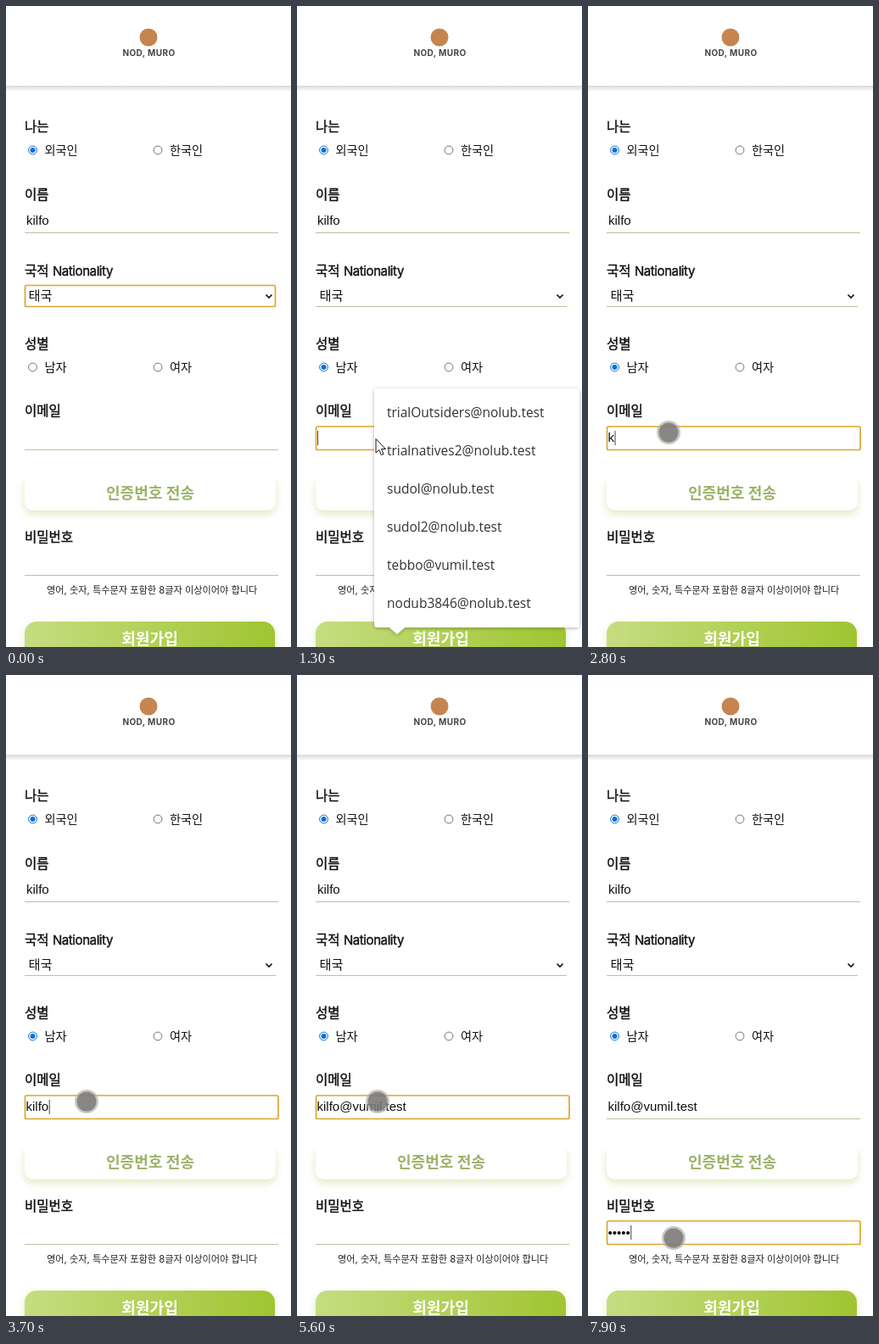
An HTML page that plays this animation: 336x756 px, repeating every 8000 ms.

```html
<!DOCTYPE html>
<html lang="ko">
<head>
<meta charset="utf-8">
<style>
html, body { margin: 0; width: 100%; height: 100%; overflow: hidden; background: #fff }
svg { display: block; width: 336px; height: 756px }
text { font-family: Inter, "Noto Sans CJK KR", "Noto Sans CJK", sans-serif; font-size: 14.2px; fill: #111; white-space: pre }
.label { font-size: 15.5px; stroke: #111; stroke-width: .4px }
.latin { font-size: 15px; letter-spacing: -.4px }
.input { font: 15px "Liberation Sans", Arial, sans-serif }
.button { font-size: 18.1px; font-weight: 700; text-anchor: middle }
.line { stroke: #bbc39b; stroke-width: 1.2 }
.focus { fill: none; stroke: #dba62c; stroke-width: 1.7 }
.mail text { font: 15.5px "Open Sans", "Noto Sans", sans-serif; fill: #333 }
</style>
</head>
<body>
<svg viewBox="0 0 336 756">
  <defs>
    <linearGradient id="green"><stop stop-color="#c5dd81"/><stop offset="1" stop-color="#a0c531"/></linearGradient>
    <linearGradient id="shade" x2="0" y2="1"><stop stop-color="#d9d9d9"/><stop offset="1" stop-color="#fff"/></linearGradient>
    <filter id="soft" x="-10%" y="-50%" width="120%" height="200%"><feDropShadow dx="0" dy="4" stdDeviation="5" flood-color="#b5ca68" flood-opacity=".42"/></filter>
    <filter id="drop"><feDropShadow dx="0" dy="1" stdDeviation="2" flood-opacity=".3"/></filter>
    <clipPath id="below"><path d="M0 559H336V620H0z"/></clipPath>
  </defs>

  <rect y="94" width="336" height="7" fill="url(#shade)"/>
  <circle cx="168" cy="37" r="10.5" fill="#c6844f"/>
  <text x="168.5" y="59" text-anchor="middle" style="font-size:10px;font-weight:700;letter-spacing:.4px;fill:#444">NOD, MURO</text>

  <g id="form"></g>
  <text class="label" x="22" y="317.5">국적 <tspan class="latin">Nationality</tspan></text>
  <text class="input" x="24" y="258">kilfo</text>
  <text x="26.5" y="346.5" style="font-size:15.2px">태국</text>
  <path d="M306.5 340.5l3.5 3.5 3.5-3.5" fill="none" stroke="#111" stroke-width="1.7"/>

  <g clip-path="url(#below)"><rect x="22" y="554" width="296" height="41" rx="10" fill="#fff" filter="url(#soft)"/></g>
  <text class="button" x="170" y="581" style="fill:#9ab368">인증번호 전송</text>
  <text x="48" y="693" style="font-size:11.2px;fill:#222">영어, 숫자, 특수문자 포함한 8글자 이상이어야 합니다</text>
  <rect x="22" y="726" width="295" height="46" rx="14" fill="url(#green)" filter="url(#soft)"/>
  <text class="button" x="169.5" y="752.5" style="fill:#fff">회원가입</text>

  <rect class="focus" id="selectFocus" x="22.5" y="329.5" width="295" height="25" rx="2"/>
  <rect class="focus" id="inputFocus" x="22.5" width="298.5" height="27.5" rx="2"/>
  <text class="input" id="email" x="23.5" y="514"></text>
  <text class="input" id="password" x="23.5" y="662.5"></text>
  <path id="compose" d="M24 517.5H38" stroke="#111"/>
  <rect id="caret" width="1" height="17" fill="#444"/>

  <g id="popup" class="mail">
    <path d="M95 451H329a4 4 0 0 1 4 4V729a4 4 0 0 1-4 4H127l-9 8-9-8H95a4 4 0 0 1-4-4V455a4 4 0 0 1 4-4z" fill="#fff" filter="url(#drop)"/>
  </g>
  <path id="arrow" d="M0 0V16.5L3.8 13 6.3 19 9 17.8 6.5 12H11.5z" fill="#fff" stroke="#111"/>
  <g id="touch">
    <circle r="14" fill="#aaa" fill-opacity=".65"/>
    <circle r="11.5" fill="#6c6864" fill-opacity=".68"/>
  </g>
</svg>
<script>
const $ = id => document.getElementById(id);
const LOOP = 8000, EMAIL = 'kilfo@vumil.test';
const emailKeys = [2700, 3000, 3200, 3400, 3600, 3850, 4050, 4200, 4350, 4450, 4600, 4700, 4800, 4900, 5000, 5100];
const passKeys = [7100, 7300, 7500, 7650, 7800];
const PICK = 500, EMAIL_FOCUS = 1100, POPUP = 1200, WRONG_KEY = 1800, ERASE = 2300, PASS_FOCUS = 6700;
// touch point: time, x, y
const route = [[100, 70, 345], [400, 31, 426], [700, 31, 426], [1100, 95, 503], [5600, 95, 503], [6400, 101, 664]];

const label = (text, y) => `<text class="label" x="22" y="${y}">${text}</text>`;
const line = (y, end) => `<path class="line" d="M22 ${y}H${end}"/>`;
const radio = (x, y, text, id) => `<g id="${id}"><circle cx="${x}" cy="${y}" r="4.9" fill="#fff" stroke="#767676"/>
  <circle cx="${x}" cy="${y}" r="3" fill="none"/></g><text x="${x + 14}" y="${y + 5}">${text}</text>`;

$('form').innerHTML =
  label('나는', 148) + label('이름', 228) + label('성별', 404) + label('이메일', 483) + label('비밀번호', 632) +
  line(267.5, 321) + line(354.5, 318) + line(523.5, 321) + line(671.5, 321) +
  radio(31.5, 170, '외국인', 'foreign') + radio(179, 170, '한국인', 'native') +
  radio(31.5, 426, '남자', 'male') + radio(179, 426, '여자', 'female');

$('popup').innerHTML += ['trialOutsiders@nolub.test', 'trialnatives2@nolub.test', 'sudol@nolub.test',
  'sudol2@nolub.test', 'tebbo@vumil.test', 'nodub3846@nolub.test']
  .map((mail, i) => `<text x="106" y="${485 + 45 * i}">${mail}</text>`).join('');

const show = (id, on) => $(id).style.display = on ? '' : 'none';
const place = (id, x, y) => $(id).setAttribute('transform', `translate(${x} ${y})`);
const count = (keys, t) => keys.filter(k => k <= t).length;

function check(id, on) {
  const [ring, dot] = $(id).children;
  ring.setAttribute('stroke', on ? '#0b6fd8' : '#767676');
  dot.setAttribute('fill', on ? '#0b6fd8' : 'none');
}

function touchAt(t) {
  const i = route.findIndex(p => p[0] > t);
  if (i < 1) return route[i ? route.length - 1 : 0].slice(1);
  const [t0, x0, y0] = route[i - 1], [t1, x1, y1] = route[i];
  const u = (t - t0) / (t1 - t0), e = u * u * (3 - 2 * u);
  return [x0 + (x1 - x0) * e, y0 + (y1 - y0) * e];
}

function draw(t) {
  const inPass = t >= PASS_FOCUS, composing = t >= WRONG_KEY && t < ERASE;
  show('selectFocus', t < PICK);
  check('male', t >= PICK);

  $('email').textContent = composing ? 'ㅋ' : EMAIL.slice(0, count(emailKeys, t));
  $('password').textContent = '•'.repeat(count(passKeys, t));
  show('compose', composing);

  show('inputFocus', t >= EMAIL_FOCUS);
  $('inputFocus').setAttribute('y', inPass ? 644 : 496);
  const field = $(inPass ? 'password' : 'email');
  const lastKey = Math.max(...[EMAIL_FOCUS, WRONG_KEY, ERASE, PASS_FOCUS, ...emailKeys, ...passKeys].filter(k => k <= t));
  show('caret', t >= EMAIL_FOCUS && Math.floor((t - lastKey) / 500) % 2 === 0);
  $('caret').setAttribute('x', 24 + field.getComputedTextLength());
  $('caret').setAttribute('y', inPass ? 649 : 501);

  const fade = Math.min(1, Math.max(0, (t - 1800) / 250));
  const popup = t >= POPUP && fade < 1;
  show('popup', popup);
  $('popup').setAttribute('opacity', 1 - fade);
  $('popup').setAttribute('transform', `translate(212 592) scale(${1 - .06 * fade}) translate(-212 -592)`);

  show('arrow', popup);
  place('arrow', ...(t < WRONG_KEY ? [93, 510.5] : [95, 502.5]));
  show('touch', t >= 100 && !popup);
  place('touch', ...touchAt(t));
}

function tick() {
  draw(Math.floor(performance.now() % LOOP / 100) * 100);
  requestAnimationFrame(tick);
}

check('foreign', true);
tick();
</script>
</body>
</html>
```
